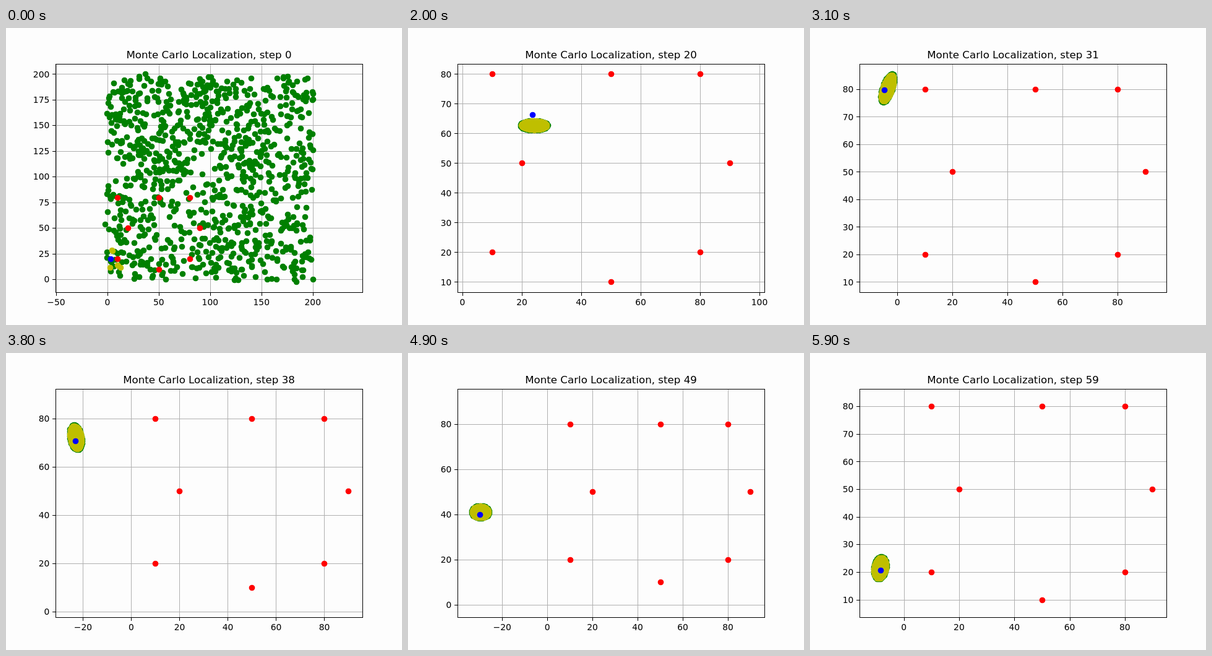
These frames come from a looping animation (640 by 480 pixels, 6000 ms). An HTML page:

```html
<!DOCTYPE html>
<html lang="en">
<head>
<meta charset="utf-8">
<title>Monte Carlo Localization</title>
<style>
html, body { margin: 0; width: 100%; height: 100%; overflow: hidden; background: #fdfdfd; }
svg { display: block; width: 640px; height: 480px; }
text { font-family: "DejaVu Sans", sans-serif; font-size: 13.89px; fill: #000; }
#title { font-size: 16.67px; text-anchor: middle; }
.x { text-anchor: middle; }
.y { text-anchor: end; }
.dots { fill: none; stroke-width: 9.7; stroke-linecap: round; }
</style>
</head>
<body>
<svg viewBox="0 0 640 480">
  <text id="title" x="328" y="49"></text>
  <path id="grid" fill="none" stroke="#b0b0b0"/>
  <path id="ticks" fill="none" stroke="#000"/>
  <path id="green" class="dots" stroke="#008000"/>
  <path id="yellow" class="dots" stroke="#bfbf00"/>
  <path id="red" class="dots" stroke="#f00"/>
  <path id="blue" class="dots" stroke="#00f"/>
  <rect x="80.5" y="58.5" width="496" height="369" fill="none" stroke="#000"/>
  <g id="labels"></g>
</svg>
<script>
const STEPS = 60, STEP_MS = 100;
const BOX = { l: 80, r: 576, t: 57.6, b: 427.2 };
const CX = (BOX.l + BOX.r) / 2, CY = (BOX.t + BOX.b) / 2;
const LANDMARKS = [[10, 20], [50, 10], [80, 20], [20, 50], [90, 50], [10, 80], [50, 80], [80, 80]];

// First survivors, relative to the robot; they merge into one cloud.
const CLUMPS = [[1.4, 7.8], [-.5, -8.9], [7.3, -6.2], [9.8, -8.8]];
const MERGE_STEPS = 6;

// The cloud is an ellipse that drifts around the robot.
const CLOUD = [
  { at: 8, dx: -4.8, dy: -3.9, a: 5.1, b: .8, turn: -40 },
  { at: 20, dx: .5, dy: -3.7, a: 4.6, b: 1.6, turn: 0 },
  { at: 31, dx: 1.2, dy: .6, a: 5.4, b: 1.8, turn: 71 },
  { at: 38, dx: .2, dy: 1.5, a: 5.2, b: 2.5, turn: 100 },
  { at: 49, dx: .15, dy: 1, a: 2.8, b: 3.95, turn: 90 },
  { at: 59, dx: -.2, dy: .7, a: 4.1, b: 2.3, turn: 80 }
];

const $ = id => document.getElementById(id);
const mix = (a, b, k) => a + (b - a) * k;

function random(seed) {
  let s = seed >>> 0;
  return () => {
    s = (s + 0x6D2B79F5) >>> 0;
    let v = Math.imul(s ^ (s >>> 15), 1 | s);
    v = (v + Math.imul(v ^ (v >>> 7), 61 | v)) ^ v;
    return ((v ^ (v >>> 14)) >>> 0) / 4294967296;
  };
}

// Constant speed 3 with a turn of 0.1 rad per step.
function robotAt(step) {
  let x = 0, y = 20;
  for (let k = 1; k <= step + 1; k++) {
    x += 3 * Math.cos(k / 10);
    y += 3 * Math.sin(k / 10);
  }
  return [x, y];
}

function scatter() {
  const rnd = random(17);
  const pts = [[-2.2, 54], [184, -2.5], [37, 200], [200, 175.5]];
  while (pts.length < 950) pts.push([mix(-1, 200, rnd()), mix(-1, 199, rnd())]);
  return pts;
}

function ellipseAt(step) {
  const s = Math.max(step, CLOUD[0].at);
  const i = Math.max(1, CLOUD.findIndex(c => c.at >= s));
  const p = CLOUD[i - 1], q = CLOUD[i];
  const k = (s - p.at) / (q.at - p.at);
  const e = {};
  for (const key in p) e[key] = mix(p[key], q[key], k);
  const c = Math.cos(e.turn * Math.PI / 180), d = Math.sin(e.turn * Math.PI / 180);
  return (angle, r) => {
    const u = e.a * r * Math.cos(angle), v = e.b * r * Math.sin(angle);
    return [e.dx + u * c - v * d, e.dy + u * d + v * c];
  };
}

function cloudAt(step, [rx, ry]) {
  const rnd = random(step * 7919 + 5);
  const ellipse = ellipseAt(step);
  const merged = Math.min(1, step / MERGE_STEPS);
  const noise = step ? 2.4 : .9;
  const sample = (n, count, rim) => {
    const clump = CLUMPS[n % CLUMPS.length];
    const onRim = n < 32;
    const angle = 2 * Math.PI * (onRim ? n / 32 : rnd());
    const target = ellipse(angle, rim * (onRim ? 1 : Math.sqrt(rnd())));
    const [x, y] = target.map((v, d) => mix(clump[d] + (rnd() - .5) * noise, v, merged));
    return [rx + x, ry + y];
  };
  const make = (count, rim) => Array.from({ length: count }, (_, n) => sample(n, count, rim));
  return {
    yellow: make(step ? 220 : 8, .93),
    green: step ? make(32, 1) : scatter()
  };
}

// Equal-aspect view with a 5 % margin around all points.
function fit(pts) {
  const range = d => {
    const v = pts.map(p => p[d]);
    return [Math.min(...v), Math.max(...v)];
  };
  const [x0, x1] = range(0), [y0, y1] = range(1);
  const scale = Math.min((BOX.r - BOX.l) / (x1 - x0), (BOX.b - BOX.t) / (y1 - y0)) / 1.1;
  const mx = (x0 + x1) / 2, my = (y0 + y1) / 2;
  return { scale, mx, my, x: v => CX + (v - mx) * scale, y: v => CY - (v - my) * scale };
}

function tickValues(mid, span) {
  const raw = span / 9, base = 10 ** Math.floor(Math.log10(raw));
  const size = base * [1, 2, 2.5, 5, 10].find(m => m * base >= raw);
  const out = [];
  for (let n = Math.ceil((mid - span / 2) / size); n * size <= mid + span / 2; n++) out.push(n * size);
  return out;
}

const snap = v => Math.round(v) + .5;

function drawAxes(view) {
  let grid = "", ticks = "", labels = "";
  const name = v => String(v).replace("-", "\u2212");
  for (const v of tickValues(view.mx, (BOX.r - BOX.l) / view.scale)) {
    const x = view.x(v), p = snap(x);
    grid += `M${p} 58V427`;
    ticks += `M${p} 428v4.9`;
    labels += `<text class="x" x="${x}" y="448">${name(v)}</text>`;
  }
  for (const v of tickValues(view.my, (BOX.b - BOX.t) / view.scale)) {
    const y = view.y(v), p = snap(y);
    grid += `M80 ${p}H576`;
    ticks += `M80 ${p}h-4.9`;
    labels += `<text class="y" x="70.3" y="${Math.round(y + 5.1)}">${name(v)}</text>`;
  }
  $("grid").setAttribute("d", grid);
  $("ticks").setAttribute("d", ticks);
  $("labels").innerHTML = labels;
}

function draw(step) {
  const robot = robotAt(step);
  const { yellow, green } = cloudAt(step, robot);
  const view = fit([...green, ...yellow, ...LANDMARKS, robot]);
  const dots = (id, pts) => $(id).setAttribute("d", pts.map(([x, y]) =>
    `M${snap(view.x(x))} ${snap(view.y(y))}h.01`).join(""));
  drawAxes(view);
  dots("green", green);
  dots("yellow", yellow);
  dots("red", LANDMARKS);
  dots("blue", [robot]);
  $("title").textContent = `Monte Carlo Localization, step ${step}`;
}

let shown = -1;
const start = performance.now();
function tick() {
  const step = Math.floor((performance.now() - start) / STEP_MS) % STEPS;
  if (step !== shown) draw(shown = step);
  requestAnimationFrame(tick);
}
tick();
</script>
</body>
</html>
```
